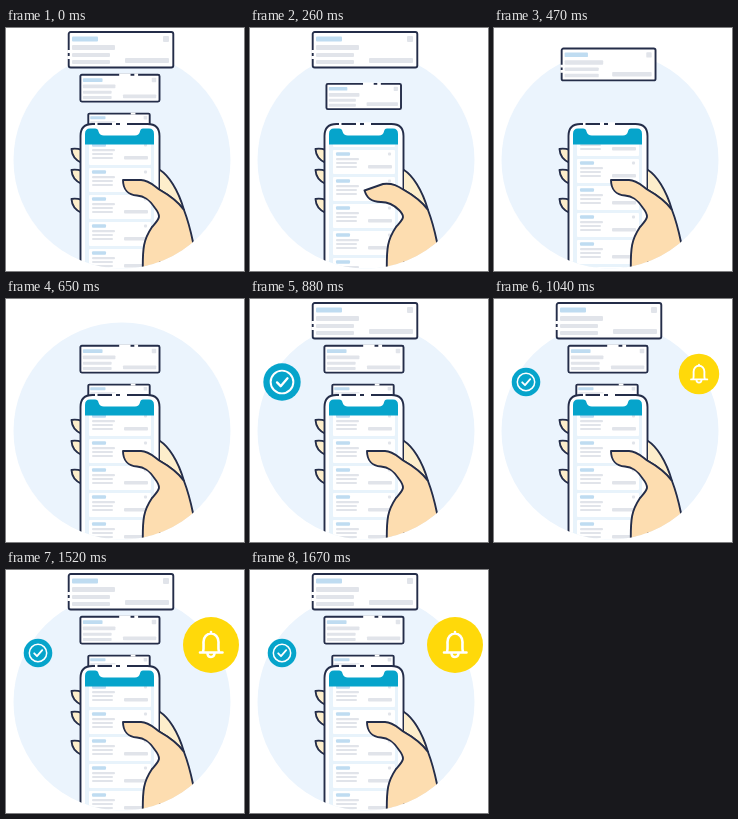
An HTML page that plays this animation: 238 px wide and 243 px high, repeating every 2430 ms.

```html
<!DOCTYPE html>
<html lang="en">
<head>
<meta charset="utf-8">
<title>Phone notifications</title>
<style>
  html, body { margin: 0; width: 100%; height: 100%; overflow: hidden; background: #fff; }
  svg { display: block; width: 238px; height: 243px; }
  .line { stroke: #242d49; stroke-width: 1.9; stroke-linejoin: round; stroke-linecap: round; vector-effect: non-scaling-stroke; }
  .skin { fill: #fdddb0; }
  .pale { fill: #fdeecb; }
  .white { fill: #fff; }
  .blue { fill: #bfdcf1; }
  .grey { fill: #e1e4ea; }
  .cyan { fill: #06a4cb; }
  .gap { stroke: #fff; stroke-width: 3.5; }
  .icon { fill: none; stroke: #fff; stroke-linecap: round; stroke-linejoin: round; }
</style>
</head>
<body>
<svg viewBox="0 0 238 243">
  <defs>
    <clipPath id="disc"><path d="M0 0H238V132H224.5A108.5 108.5 0 0 1 7.5 132H0Z"/></clipPath>
    <clipPath id="screen"><path d="M79 116H148V243H79Z"/></clipPath>
  </defs>
  <circle cx="116" cy="132" r="108.5" fill="#ebf4fd"/>
  <g id="cards"></g>
  <g clip-path="url(#disc)">
    <g id="fingers"></g>
    <path class="line white" d="M74.5 250V108Q74.5 96 86.5 96H141.5Q153.5 96 153.5 108V250Z"/>
    <path class="gap" d="M89 96h2.5M106 96h4M114 96h7"/>
    <path d="M79 116H148V243H79Z" fill="#e8f3fb"/>
    <g clip-path="url(#screen)"><g id="list"></g></g>
    <path class="cyan" d="M79 116.5V106Q79 100.5 84 100.5H89Q92 100.5 92.5 103.5Q93.5 107.5 98 107.5H129Q133 107.5 134 103.5Q134.5 100.5 137 100.5H143Q148 100.5 148 106V116.5Z"/>
    <path class="line pale" d="M154 142C162 147 172 161 178 182Q170 171 154 162"/>
    <path id="hand" class="line skin"/>
  </g>
  <g id="check">
    <circle class="cyan" r="14.3"/>
    <circle class="icon" r="8.7" stroke-width="1.5"/>
    <path class="icon" d="M-3.8 .3L-1 3.2L4.2-2.8" stroke-width="1.8"/>
  </g>
  <g id="bell">
    <circle r="28" fill="#ffd90a"/>
    <path class="icon" stroke-width="2.6" d="M-11 7.5H11.5M-8 7C-7 4-7.5 0-7.5-3C-7.5-8-4-11.5 0-11.5S7.5-8 7.5-3C7.5 0 7 4 8 7M0-11.5V-13M-3.5 8Q-3.5 12 0 12T3.5 8"/>
  </g>
</svg>
<script>
const LOOP = 2430;
const STEP = 60;             // length of every dive, scroll and swipe
const BEATS = [200, 340, 520];
const SCROLL = 9;            // list travel per beat
const TOP = 3, HIDDEN = 98;  // highest card, and fully behind the phone
const CARDS = [
  { id: 'top', rest: 3, leave: 455, back: 770, gap: 'M-52 19v3M-52 25v3' },
  { id: 'mid', rest: 46, leave: 245, back: 590, gap: 'M-1 1h15M19 1h5' },
  { id: 'low', rest: 85, leave: 200, back: 560, gap: 'M20 1h8' }
];

const $ = id => document.getElementById(id);
const clamp = x => Math.max(0, Math.min(1, x));
const ease = x => (x = clamp(x), x * x * (3 - 2 * x));
const move = (t, begin) => ease((t - begin) / STEP);
const there = (t, begin, back) => move(t, begin) - move(t, back);
const sum = (list, f) => list.reduce((s, v) => s + f(v), 0);

// Grow from nothing with an overshoot set by s.
function pop(t, begin, length, s) {
  const x = clamp((t - begin) / length) - 1;
  return Math.max(0, 1 + (s + 1) * x ** 3 + s * x * x);
}

const bar = (x, y, w, h, cls) =>
  `<rect x="${x}" y="${y}" width="${w}" height="${h}" rx="1" class="${cls}"/>`;

const card = ({ id, gap }) => `<g id="${id}">
  <rect x="-52.3" y="1" width="104.6" height="35.5" rx="2" class="line white"/>
  ${bar(-49, 5.5, 26, 5, 'blue')}${bar(-49, 14, 43, 5, 'grey')}
  ${bar(-49, 22, 38, 4, 'grey')}${bar(-49, 29, 38, 4, 'grey')}
  ${bar(4, 27, 44, 5, 'grey')}${bar(42, 5, 6, 6, 'grey')}
  <path class="gap" d="${gap}"/></g>`;

const row = y => `<g transform="translate(0 ${y})">
  ${bar(83, -4, 62, 24, 'white')}${bar(86, -1.7, 14, 3.4, 'blue')}
  ${bar(86, 4, 23, 2.2, 'grey')}${bar(86, 8, 21, 2, 'grey')}${bar(86, 12, 21, 2, 'grey')}
  ${bar(118, 11, 24, 3.4, 'grey')}${bar(138, -1.5, 3, 3, 'grey')}</g>`;

const finger = y =>
  `<path class="line pale" d="M76 ${y + 1}Q70 ${y - 1} 65.5 ${y}Q66 ${y + 10} 76 ${y + 14}"/>`;

// Front of the hand; p is how far the thumb is pulled down.
const hand = p => `M178 182Q183 195 187 214L192 250H137C136 218 138 211 146 199
  C153 191 156 189 149 ${180 + 2 * p}
  C143 ${171 + 5 * p} 138 ${168 + 6 * p} 131 ${167.5 + 6.5 * p}
  C${122 - p} ${167 + 7 * p} 117 ${161 + 9 * p} ${117 - 2.5 * p} ${152 + 10.5 * p}
  L${135 - 2 * p} ${152 + 4 * p}C143 ${152 + 3 * p} 148 158 154 162Q170 171 178 182`;

function place(id, x, y, s) {
  $(id).setAttribute('transform', `translate(${x} ${y}) scale(${s})`);
  $(id).style.display = s > 0 ? '' : 'none';
}

function draw(t) {
  for (const { id, rest, leave, back } of CARDS) {
    const y = rest + (HIDDEN - rest) * there(t, leave, back);
    const depth = y - TOP;
    place(id, 115 - depth / 41, y, y < HIDDEN ? Math.exp(-depth / 154) : 0);
  }
  const scroll = SCROLL * sum(BEATS, b => move(t, b));
  const pull = sum(BEATS, b => there(t, b, b + STEP));
  $('list').setAttribute('transform', `translate(0 ${scroll})`);
  $('hand').setAttribute('d', hand(pull));
  place('check', 32, 83, pop(t, 770, 210, 3.5));
  place('bell', 205, 75, pop(t, 1010, 150, 1.7));
}

$('cards').innerHTML = CARDS.map(card).join('');
$('list').innerHTML = Array.from({ length: 7 }, (_, i) => row(90 + 27 * i)).join('');
$('fingers').innerHTML = [121, 142, 171].map(finger).join('');

const start = performance.now();
function tick() {
  draw((performance.now() - start) % LOOP);
  requestAnimationFrame(tick);
}
tick();
</script>
</body>
</html>
```
